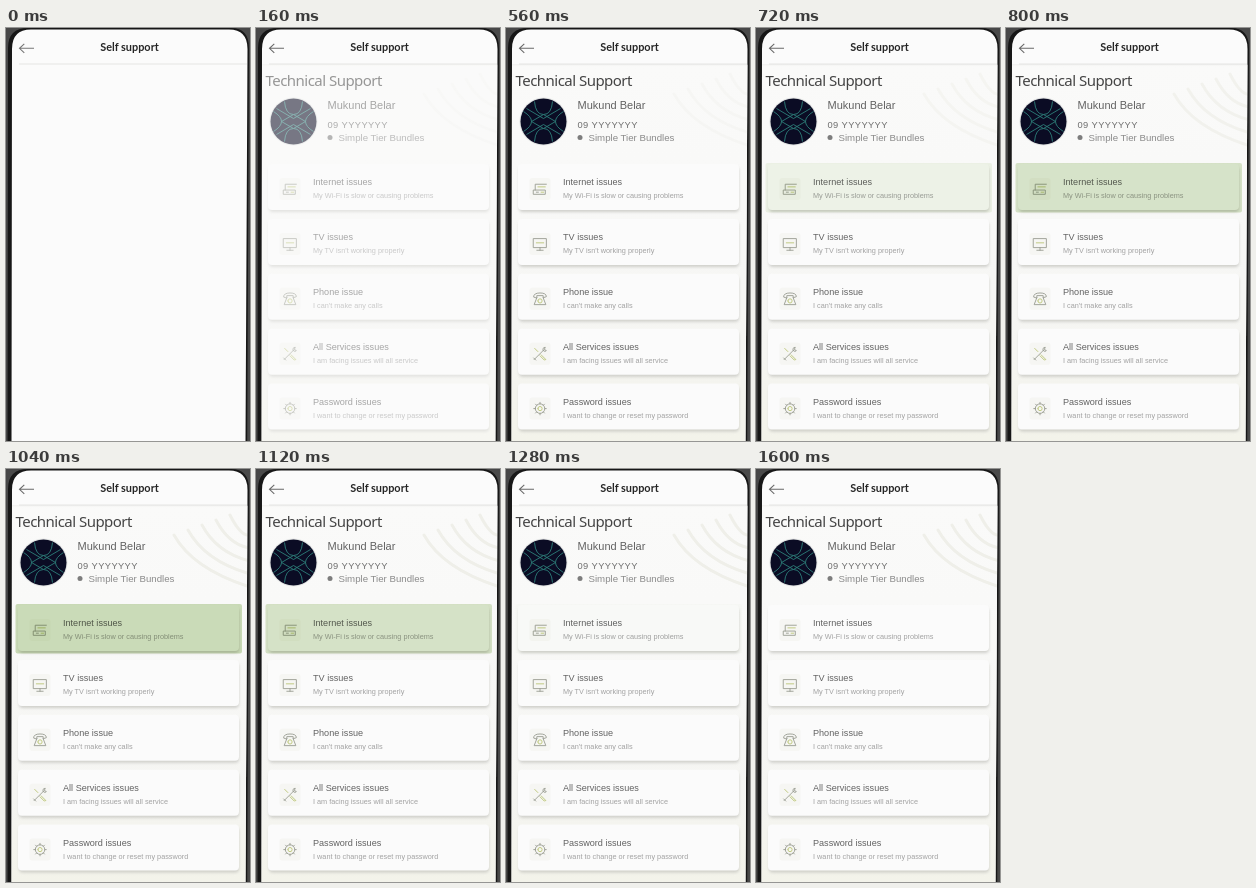
Write an HTML page that moves like this. It is 244 px wide and 413 px high and loops after 3040 ms.

```html
<!DOCTYPE html>
<html lang="en">
<head>
<meta charset="utf-8">
<title>Self support</title>
<style>
html, body { margin: 0; width: 100%; height: 100%; overflow: hidden; background: #484848; }
svg { display: block; width: 244px; height: 413px; }
text { font-family: "Liberation Sans", Arial, sans-serif; }
.bar { font: 700 10.9px Lato, sans-serif; fill: #262626; }
.head { font: 400 15px "Noto Sans", sans-serif; letter-spacing: -.53px; fill: #444; }
.name { font-size: 11px; fill: #626262; }
.phone { font-size: 9.3px; letter-spacing: .42px; fill: #6c6c6c; }
.plan { font-size: 9.67px; fill: #8a8a8a; }
.title { font-size: 9.1px; fill: #626262; }
.sub { font-size: 7.3px; fill: #a2a2a2; }
.line { fill: none; stroke: #999c91; stroke-width: .85; stroke-linecap: round; stroke-linejoin: round; }
.accent { stroke: #bcc676; }
#glow { mix-blend-mode: multiply; }
</style>
</head>
<body>
<svg viewBox="0 0 244 413">
  <defs>
    <clipPath id="screen"><path id="edge" d="M5.5 413L6 21Q6 1.5 25 1.5H223Q241.5 1.5 241.5 21L239.5 413Z"/></clipPath>
    <linearGradient id="page" x2="0" y2="1">
      <stop stop-color="#fafaf9"/><stop offset=".25" stop-color="#f9f9f8"/><stop offset=".75" stop-color="#f5f5f2"/><stop offset="1" stop-color="#f3f3ea"/>
    </linearGradient>
    <linearGradient id="fall" x2="0" y2="1">
      <stop stop-color="#d8d8d5"/><stop offset="1" stop-color="#f4f4f2" stop-opacity="0"/>
    </linearGradient>
    <filter id="soft" x="-10%" y="-20%" width="120%" height="150%"><feGaussianBlur stdDeviation="1.7"/></filter>
  </defs>
  <path d="M1.5 413L2 20Q2 0 22 0H225Q243 0 243 20L241.2 413Z" fill="#171717"/>
  <use href="#edge" fill="#fbfbfb"/>
  <g clip-path="url(#screen)">
    <path d="M13 36H241" stroke="#ececeb" stroke-width="1.6"/>
    <g id="content" opacity="0">
      <path d="M5 37H242V413H5Z" fill="url(#page)"/>
      <path d="M5 36H242V39H5Z" fill="url(#fall)" opacity=".35"/>
      <g id="swirl" fill="none" stroke="#efefe9" stroke-width="3" stroke-linecap="round"></g>
      <text class="head" x="9.5" y="57.9">Technical Support</text>
      <circle cx="37.5" cy="93.5" r="24" fill="#e2e4e3"/>
      <circle cx="37.5" cy="93.5" r="23" fill="#0b0c24"/>
      <g id="motif" fill="none" stroke="#2d7f7a" stroke-width=".9" transform="translate(37.5 93.5)"></g>
      <text class="name" x="71.5" y="80.8">Mukund Belar</text>
      <text class="phone" x="71.5" y="100">09 YYYYYYY</text>
      <circle cx="74" cy="109.5" r="2.5" fill="#7d7d7d"/>
      <text class="plan" x="82.5" y="113">Simple Tier Bundles</text>
      <g id="cards"></g>
    </g>
    <path id="arrow" d="M28 20.3H13.5M18.3 15.8L13.5 20.3L18.3 24.8" fill="none" stroke="#777" stroke-width="1.1"/>
    <text class="bar" x="123.5" y="23.3" text-anchor="middle">Self support</text>
  </g>
</svg>
<script>
const el = id => document.getElementById(id);
const line = (d, accent) => `<path class="line${accent ? " accent" : ""}" d="${d}"/>`;

// Icons are drawn around their own centre.
const gear = Array.from({ length: 8 }, (_, i) => {
  const a = i * Math.PI / 4, x = Math.cos(a), y = Math.sin(a);
  return `M${x * 4.5} ${y * 4.5}L${x * 5.9} ${y * 5.9}`;
}).join("");
const icons = [
  line("M-6 1H5V5H-6ZM-4.5 1V-4.5H6M-3.5 3H-1.5") + line("M-2-2H5M1 3H3.5", 1),
  line("M-6-5H6V3.5H-6ZM-3 6H3M0 3.5V6") + line("M-3.5-1H3.5", 1),
  line("M-6-2Q-6-5.5 0-5.5T6-2L3-1V-3H-3V-1ZM-3-1L-5.5 5.5H5.5L3-1") + line("M-2 2A2 2 0 1 0 2 2A2 2 0 1 0-2 2", 1),
  line("M-5.5 5.5L3-3M3-3Q2-6 5-6L4-4L6-3Q5-1 3-3M-4 6L-6 4") + line("M-5-5L-2-2M1 1L5.5 5.5L4 6L0 2", 1),
  line("M-4.5 0A4.5 4.5 0 1 0 4.5 0A4.5 4.5 0 1 0-4.5 0" + gear) + line("M-2 0A2 2 0 1 0 2 0A2 2 0 1 0-2 0", 1)
];
const rows = [
  ["Internet issues", "My Wi-Fi is slow or causing problems"],
  ["TV issues", "My TV isn't working properly"],
  ["Phone issue", "I can't make any calls"],
  ["All Services issues", "I am facing issues will all service"],
  ["Password issues", "I want to change or reset my password"]
];
el("cards").innerHTML = rows.map(([title, sub], i) => `
  <g transform="translate(0 ${136 + i * 54.9})">
    <rect x="13" y="3" width="220" height="45" rx="4" fill="#b9b9b4" opacity=".65" filter="url(#soft)"/>
    <rect x="12" width="221" height="46" rx="4" fill="#fbfbfb"/>
    <rect x="23.5" y="14" width="21" height="22" rx="3" fill="#f3f3ee" opacity=".65"/>
    <g transform="translate(34 25) scale(1.06)">${icons[i]}</g>
    <text class="title" x="57" y="21.3">${title}</text>
    <text class="sub" x="57" y="34.4">${sub}</text>
  </g>`).join("") +
  '<rect id="glow" x="9.5" y="135" width="226.5" height="49.5" rx="2" fill="#c9dcb4" opacity="0"/>';

el("swirl").innerHTML = Array.from({ length: 5 }, (_, i) =>
  `<path d="M${168 + i * 14} ${66 - i * 5}Q${187 + i * 12} ${100 - i * 8} 244 ${118 - i * 13}"/>`).join("");

const arcs = "M-9-20Q-8-7 0-7T9-20M-20-10Q-4 0-20 10M-17-13L0-3L17-13";
el("motif").innerHTML = [1, -1].map(s => `<path transform="scale(${s})" d="${arcs}"/>`).join("") +
  '<path d="M-12 0L0-7L12 0L0 7Z"/>';

const STEP = 80, LOOP = 3040;
// [start step, values per step]; the last value holds.
const fade = [1, [.25, .55, .85, 1]];
const glow = [9, [.27, .68, 1, 1, .9, .7, .38, .06, 0]];
const swirl = [8, [.3, .45, .7, 1]];
const at = ([start, list], n, before = 0) =>
  n < start ? before : list[Math.min(n - start, list.length - 1)];

function draw(now) {
  const n = Math.floor(now % LOOP / STEP);
  const shown = at(fade, n);
  el("content").setAttribute("opacity", shown);
  el("glow").setAttribute("opacity", at(glow, n));
  el("swirl").setAttribute("opacity", at(swirl, n, .3));
  el("arrow").setAttribute("stroke", shown > .5 ? "#6a6a6a" : "#777");
}
const origin = performance.now();
function tick() {
  draw(performance.now() - origin);
  requestAnimationFrame(tick);
}
tick();
</script>
</body>
</html>
```
